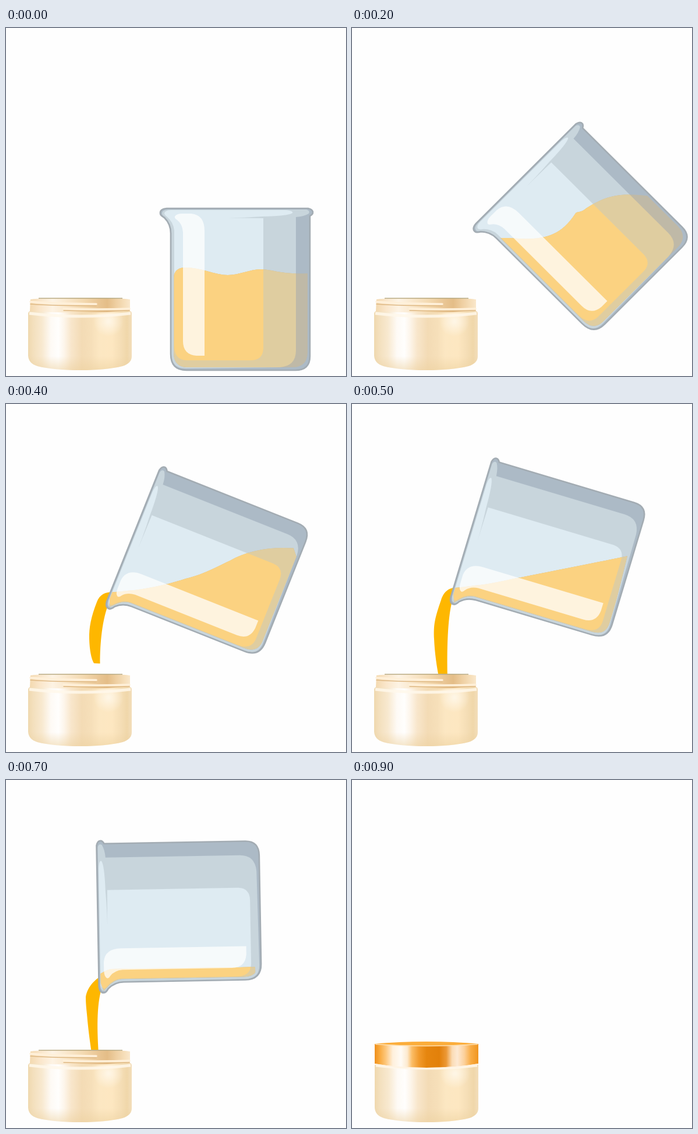
Write an HTML page with a canvas that moves like this. It is 584 by 600 pixels and loops after 1 s.

```html
<!DOCTYPE html>
<html lang="en">
<head>
<meta charset="utf-8">
<title>Pouring</title>
<style>
html, body { margin: 0; width: 100%; height: 100%; overflow: hidden; background: #fefefe; }
canvas { display: block; }
</style>
</head>
<body>
<canvas id="stage" width="584" height="600"></canvas>
<script>
const ctx = document.getElementById('stage').getContext('2d');
const STEP = 100, CENTER = [402, 451];

// Beaker parts, drawn upright
const glass = {
  outline: 'M265 320Q264 312 276 311L519 311Q528 313 527 319Q526 322 522 324L522 566Q522 590 497 590L310 590Q283 590 283 562L283 354Q283 338 272 327Q265 323 265 320Z',
  inside: 'M268 319L282 314L518 314L518 560Q517 584 494 585L310 585Q288 584 288 560L288 350Q287 336 274 325Z',
  mid: 'M268 319Q268 314 278 313L516 313Q523 315 520 320Q512 325 498 326L498 556Q498 583 470 585L308 587Q284 587 284 562L284 352Q283 337 273 326Q267 322 268 319Z',
  light: 'M272 319Q274 314 284 314L480 314Q494 315 492 319Q485 324 440 325Q400 328 362 327L442 328L442 553Q441 573 420 573L310 573Q289 572 289 548L289 350Q288 335 276 325Q272 322 272 319Z',
  shine: 'M290 325Q293 320 303 320L318 320Q341 322 341 350L341 565L327 565Q304 563 304 540L304 352Q303 338 294 331Q289 328 290 325Z'
};
for (const k in glass) glass[k] = new Path2D(glass[k]);

// pose: centre x, centre y, degrees; liquid and stream in stage coordinates
const upright = {
  pose: '402 451 0',
  liquid: 'M288 432C288 418 297 413 308 413C335 413 360 426 381 426C400 426 420 416 437 416C460 416 470 425 518 423L600 423L600 600L200 600Z'
};
const tilted = {
  pose: '401 347 -45',
  liquid: 'M240 362C250 362 260 362 270 362C320 366 355 364 383 321C386 315 392 320 402 311C440 286 465 284 515 290L600 300L600 600L200 600Z'
};
const pourStart = {
  pose: '360 297 -63.2',
  liquid: 'M160 333C185 333 200 331 220 330C260 325 300 316 328 303C355 295 365 275 378 262C410 232 455 225 515 235L600 260L600 600L100 600Z',
  stream: 'M190 332C176 331 164 333 159 345C150 365 145 390 145 405C145 418 147 424 153 424L159 425C160 400 166 372 182 345Z'
};
const pourFull = {
  pose: '340 252 -73.3',
  liquid: 'M160 318C185 317 200 314 220 312C250 308 270 302 290 299C330 291 360 285 390 279C420 273 450 267 473 262L440 395L400 420L100 420Z',
  stream: 'M182 316C168 316 158 322 153 338C142 370 140 380 141 405C142 430 146 455 149 470L164 470C163 425 164 370 172 340Z'
};
const pourLow = {
  pose: '297.5 227.5 -91',
  liquid: 'M150 340C162 335 170 328 180 326C200 325 220 325 240 325C290 324 330 324 370 323C390 323 410 323 428 322L430 400L400 400L100 400Z',
  stream: 'M168 335C155 342 140 355 137 374C137 390 139 400 140 415C142 435 144 450 147 470L159 470C156 425 156 380 166 355Z'
};
const pourEnd = {
  pose: '269.6 204 -103.3',
  liquid: 'M150 340C160 339 165 338 175 337C190 335 200 334 205 333C210 333 215 332 218 332C220 331 223 331 225 331L225 345L200 380L100 380Z',
  stream: 'M165 339C152 340 143 345 144 362C145 380 148 395 150 412C152 430 156 450 160 470L166 470C164 430 163 385 168 355Z'
};

// Halfway between two states, number by number
function between(a, b) {
  const out = {};
  for (const k in a) {
    const nums = b[k].match(/-?[\d.]+/g);
    let i = 0;
    out[k] = a[k].replace(/-?[\d.]+/g, n => (+n + +nums[i++]) / 2);
  }
  return out;
}

const steps = [
  upright, between(upright, tilted), tilted,
  pourStart, between(pourStart, pourFull), pourFull,
  between(pourFull, pourLow), pourLow, pourEnd, null
];

function fill(path, color) {
  ctx.fillStyle = color;
  ctx.fill(typeof path === 'string' ? new Path2D(path) : path);
}

function line(path, color, width) {
  ctx.strokeStyle = color;
  ctx.lineWidth = width;
  ctx.stroke(typeof path === 'string' ? new Path2D(path) : path);
}

// Horizontal gradient from 'x color' pairs
function across(list) {
  const x0 = 38, w = 180, g = ctx.createLinearGradient(x0, 0, x0 + w, 0);
  for (const s of list.split(',')) {
    const [x, color] = s.split(' ');
    g.addColorStop((x - x0) / w, color);
  }
  return g;
}

const bodyTone = across('38 #efd8ae,46 #f3dfbc,62 #f8e9d0,77 #fefaf5,90 #fffefd,100 #fdf5ea,112 #f8e6cb,130 #f3dbb5,146 #f6dfb9,160 #fce7c2,182 #fde7c1,197 #f5deb6,208 #f0d7aa,218 #f3dfbf');
const neckTone = across('40 #f3d8ae,58 #fae6ca,80 #fdf3e4,104 #fae8cd,135 #f3d8ae,160 #e9c593,174 #e4bd87,190 #efd0a3,204 #f6dfbb,214 #fae8cd');
const lidTone = across('39 #ee8f1c,47 #f9a83a,58 #fdc77c,70 #fff0dc,84 #fffbf5,95 #fdeacf,103 #fbbd66,115 #f19a2c,128 #e6860f,150 #e2800a,162 #ec9836,172 #fbdcb5,181 #fde9d3,193 #fcd09a,204 #f9ac44,217 #f0951f');

function shades(dark, mid, light) {
  fill(glass.outline, dark);
  fill(glass.mid, mid);
  fill(glass.light, light);
}

function beaker({ pose, liquid }) {
  const [x, y, deg] = pose.split(' ').map(Number);
  const place = () => {
    ctx.translate(x, y);
    ctx.rotate(deg * Math.PI / 180);
    ctx.translate(-CENTER[0], -CENTER[1]);
  };
  ctx.save();
  place();
  shades('#acbac6', '#c8d5dc', '#deebf2');
  ctx.restore();

  ctx.save();
  ctx.clip(new Path2D(liquid));
  place();
  ctx.clip(glass.inside);
  shades('#bfb9a7', '#dfcda0', '#fbd281');
  ctx.restore();

  ctx.save();
  place();
  fill(glass.shine, 'rgba(255,255,255,.74)');
  line(glass.outline, '#a3acb3', 2.6);
  ctx.restore();
}

function jarBody() {
  const body = 'M38 492Q39 487 46 487L208 487Q216 487 216 492L216 566Q216 578 200 583Q172 590 127 590Q82 590 54 583Q38 578 38 564Z';
  fill(body, bodyTone);
  const glow = ctx.createRadialGradient(176, 506, 2, 176, 506, 26);
  glow.addColorStop(0, 'rgba(255,250,240,.75)');
  glow.addColorStop(1, 'rgba(255,250,240,0)');
  ctx.save();
  ctx.clip(new Path2D(body));
  fill('M140 480H212V534H140Z', glow);
  const base = ctx.createLinearGradient(0, 566, 0, 590);
  base.addColorStop(0, 'rgba(236,208,158,0)');
  base.addColorStop(1, 'rgba(236,208,158,.55)');
  fill('M38 566H218V592H38Z', base);
  ctx.restore();
  line('M40 492Q127 502 214 492', 'rgba(255,248,236,.85)', 5);
}

function neck() {
  fill('M42 468Q60 465 127 465Q195 465 213 468L213 488Q127 494 41 488Z', neckTone);
  line('M56 466H200', '#b9ab84', 1.6);
  ctx.lineCap = 'round';
  line('M42 476Q80 479 155 479', '#dfb984', 1.5);
  line('M42 472Q80 475 155 476', '#fff0d9', 3.5);
  line('M99 487Q160 489 212 487', '#dfb984', 1.5);
  line('M99 484Q160 486 212 484', '#fff0d9', 3.5);
  ctx.lineCap = 'butt';
}

function lid() {
  fill('M39 455Q80 452 128 452Q176 452 217 455L217 489Q178 496 128 496Q78 496 39 489Z', lidTone);
  fill('M39 455Q80 451 128 451Q176 451 217 455Q176 458 128 458Q80 458 39 455Z', '#fbad3b');
  line('M40 455.5Q80 458.5 128 458.5Q176 458.5 216 455.5', '#fee0b2', 1.3);
  line('M39 490Q78 497 128 497Q178 497 217 490', '#fff3e2', 2);
}

function draw(now) {
  const state = steps[Math.floor(now / STEP) % steps.length];
  ctx.fillStyle = '#fefefe';
  ctx.fillRect(0, 0, 584, 600);
  if (state) {
    if (state.stream) fill(state.stream, '#feb700');
    beaker(state);
    jarBody();
    neck();
  } else {
    ctx.save();
    ctx.translate(1, 0);
    jarBody();
    ctx.restore();
    lid();
  }
}

const start = performance.now();
function tick() {
  draw(performance.now() - start);
  requestAnimationFrame(tick);
}
tick();
</script>
</body>
</html>
```
